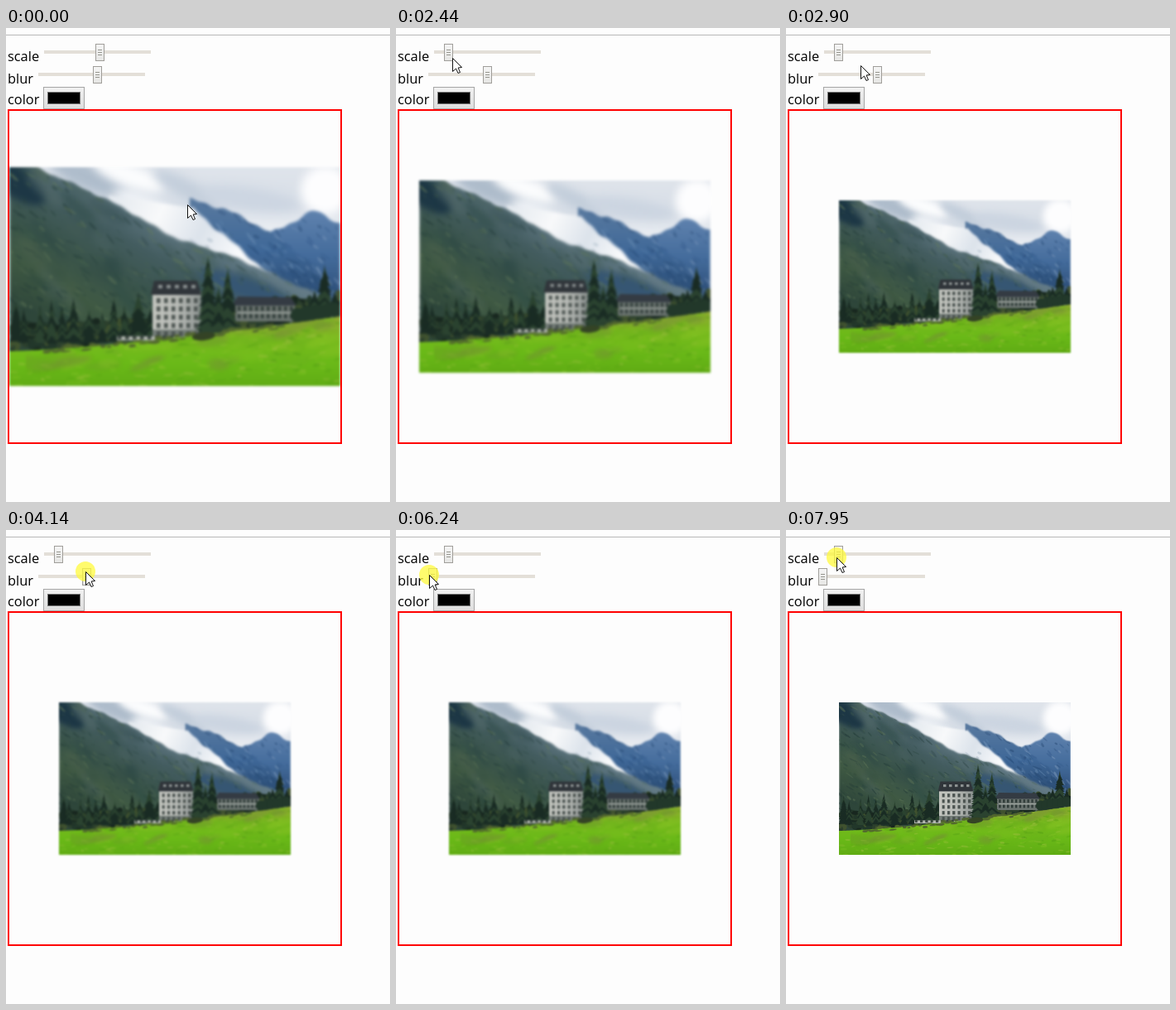
Animation, 464 px wide and 572 px high, one loop 8000 ms. Source, as an HTML page with a canvas:

```html
<!DOCTYPE html>
<html lang="en">
<head>
<meta charset="utf-8">
<title>Image filter controls</title>
<style>
html, body { margin: 0; width: 100%; height: 100%; overflow: hidden; background: #fdfdfd; }
canvas { display: block; }
</style>
</head>
<body>
<canvas id="stage" width="464" height="572"></canvas>
<script>
const LOOP = 8000, W = 400, H = 264;
const ctx = document.getElementById('stage').getContext('2d');

// Pointer moves: start, end, destination
const moves = [
  [0, 340, 135, 52], [500, 950, 109, 22], [1350, 1650, 94, 28], [1650, 2120, 61.5, 30],
  [2300, 2590, 74, 43], [2590, 3130, 102, 47], [3210, 3450, 106, 53], [4060, 4140, 96, 50],
  [4140, 4700, 56, 53], [4920, 5150, 72, 60], [5310, 5780, 59, 55], [6000, 6350, 31, 53],
  [6460, 7010, 61, 37], [7100, 7330, 61, 33]
];
const scaleDrags = [[1180, 2340]];
const blurDrags = [[3600, 4850], [5930, 6430]];
const presses = [...scaleDrags, ...blurDrags, [7950, LOOP]];

const clamp = (v, lo = 0, hi = 1) => Math.min(hi, Math.max(lo, v));
const easeOut = (t, start, length) => 1 - Math.pow(1 - clamp((t - start) / length), 2.3);

function pointerAt(t) {
  let x = 219, y = 213;
  for (const [start, end, toX, toY] of moves) {
    const p = clamp((t - start) / (end - start));
    x += (toX - x) * p;
    y += (toY - y) * p;
  }
  return [x, y];
}

// Both thumbs are only ever dragged to the left
function thumbAt(t, rest, least, grab, drags) {
  for (const [from, to] of drags)
    if (t >= from) rest = Math.min(rest, pointerAt(Math.min(t, to))[0] + grab);
  return Math.max(rest, least);
}

function shade(c, x0, y0, x1, y1, ...colors) {
  const g = c.createLinearGradient(x0, y0, x1, y1);
  colors.forEach((color, i) => g.addColorStop(i / (colors.length - 1), color));
  return g;
}

function trace(c, pts) {
  c.beginPath();
  for (let i = 0; i < pts.length; i += 2) c.lineTo(pts[i], pts[i + 1]);
  c.closePath();
}

function paintLandscape() {
  const cv = document.createElement('canvas');
  cv.width = W; cv.height = H;
  const c = cv.getContext('2d');
  let seed = 7;
  const rnd = (a = 0, b = 1) => {
    seed = (seed * 16807) % 2147483647;
    return a + (b - a) * seed / 2147483647;
  };
  const box = (color, x, y, w, h) => { c.fillStyle = color; c.fillRect(x, y, w, h); };
  const soft = (blur, draw) => { c.save(); c.filter = `blur(${blur}px)`; draw(); c.restore(); };
  const blob = (color, x, y, rx, ry, turn = 0) => {
    c.fillStyle = color;
    c.beginPath(); c.ellipse(x, y, rx, ry, turn, 0, 7); c.fill();
  };
  const below = (top, x0 = 0, x1 = W) => {
    const pts = [x1, H, x0, H];
    for (let x = x0; x <= x1; x += 2) pts.push(x, top(x));
    trace(c, pts);
  };
  const area = (color, top, x0, x1) => { below(top, x0, x1); c.fillStyle = color; c.fill(); };
  // Random streaks inside the area under a curve
  const streaks = (top, x0, colors, count, turn, size, y0, y1) => {
    c.save();
    below(top, x0); c.clip();
    for (let i = 0; i < count; i++) {
      c.globalAlpha = rnd(.15, .5);
      blob(colors[i % colors.length], rnd(x0, W), rnd(y0, y1),
        rnd(2, 8) * size, rnd(.6, 2) * size, turn + rnd(-.3, .3));
    }
    c.restore();
  };
  const fir = (x, top, bottom, w) => {
    for (let y = top; y < bottom; y += 4) {
      const r = 1 + w * Math.pow((y - top) / (bottom - top), .7);
      c.fillStyle = rnd() < .6 ? '#1a2c24' : '#2b4330';
      trace(c, [x, y - 4, x + r * rnd(.7, 1.1), y + 6, x - r * rnd(.7, 1.1), y + 6]);
      c.fill();
    }
  };
  const windows = (color, x0, x1, y0, y1, dx, dy) => {
    for (let y = y0; y < y1; y += dy)
      for (let x = x0; x < x1; x += dx) box(color, x, y, dx * .5, dy * .6);
  };

  const jag = x => Math.sin(x * .31) + 1.6 * Math.sin(x * .13 + 1);
  const ridge = x => .45 * (x - 32) + 9 * Math.exp(-(((x - 200) / 50) ** 2)) + jag(x) * .6;
  const peak = x => 40 + .2 * (x - 222) + .0024 * (x - 222) ** 2 + jag(x);
  const farPeak = x => 51 + .55 * Math.hypot(x - 369, 4) + jag(x);
  const glacier = x => x < 222 ? 34 + .15 * (x - 120) : 50 + .85 * (x - 222) + jag(x);
  const meadow = x => 222 - 42 * Math.pow(x / W, 1.4);

  box(shade(c, 0, 0, 0, 90, '#dfe4eb', '#d7dee7', '#f3f5f8'), 0, 0, W, H);
  soft(6, () => {
    blob('#aebccb', 95, 12, 50, 15, .4);
    blob('#fbfcfd', 145, 10, 45, 13, .35);
    blob('#c3cedb', 215, 27, 45, 11, .5);
    blob('#ccd5e1', 290, 38, 60, 13, .15);
    blob('#fdfdfe', 382, 28, 30, 30);
    blob('#f0f3f7', 160, 42, 38, 9, .35);
  });

  soft(1, () => {
    area(shade(c, 0, 52, 0, 165, '#5f82ae', '#436b9b', '#2b4a72'), farPeak, 316);
    area(shade(c, 0, 40, 0, 160, '#58799f', '#3f6898', '#294a70'), peak, 218);
  });
  streaks(farPeak, 316, ['#24466f', '#86a0bf', '#365b8c'], 90, .8, 1, 52, 165);
  streaks(peak, 218, ['#24466f', '#6d90b6', '#2b517f'], 200, .65, 1.2, 42, 165);
  soft(1.5, () => {
    area(shade(c, 130, 40, 325, 135, '#e6ebf0', '#f8f9fa', '#dce3eb', '#fafbfc', '#eef1f4'), glacier, 120, 326);
  });
  streaks(x => Math.max(glacier(x), ridge(x) - 14), 140, ['#a8b6c3', '#8197a8'], 40, .5, 1.2, 60, 125);

  soft(1.5, () => {
    area(shade(c, 140, 35, 50, 190, '#647b87', '#435c5f', '#3a544b', '#3f5943', '#2e463a'), ridge);
  });
  soft(4, () => {
    blob('#1d3745', 8, 18, 42, 18, .6);
    streaks(ridge, 0, ['#24403f', '#546a50', '#2c4a44', '#566d6d'], 70, .65, 5, 0, 180);
    blob('#365673', 290, 148, 65, 13, .35);
  });
  streaks(ridge, 0, ['#1f3735', '#647b5a', '#29443d', '#46614c'], 480, .65, 1.1, 0, 190);

  // Tree line
  for (let i = 0; i < 420; i++) {
    const x = rnd(0, W), edge = meadow(x);
    blob(['#18271f', '#22372a', '#2c402d', '#40522f'][i % 4],
      x, edge - 27 * rnd() ** 1.3 - 3, rnd(3, 8), rnd(3, 7));
  }
  for (let x = 8; x < 175; x += rnd(9, 20)) fir(x, rnd(160, 178), 208, rnd(6, 12));
  fir(156, 154, 208, 17);

  // Buildings
  box(shade(c, 172, 0, 232, 0, '#c3c5bf', '#b9bcb7', '#8f9593'), 173, 150, 59, 46);
  box('#747d78', 173, 196, 56, 10);
  c.fillStyle = '#30353a';
  trace(c, [171, 154, 175, 137, 227, 137, 232, 154]);
  c.fill();
  windows('#4b5350', 178, 230, 158, 200, 9, 10);
  windows('#8c9292', 180, 224, 142, 146, 10, 7);
  box('#b3b7b1', 130, 204, 70, 5);
  windows('#38443e', 131, 198, 203, 208, 9, 8);

  box('#6c7571', 273, 164, 72, 22);
  c.fillStyle = '#343b43';
  trace(c, [269, 167, 276, 156, 340, 157, 347, 167]);
  c.fill();
  windows('#303c39', 276, 342, 168, 184, 7, 9);
  box('#a4aba6', 276, 175, 65, 1.5);
  for (const [x, top, w] of [[240, 110, 16], [264, 125, 13], [253, 146, 10], [381, 121, 14], [369, 150, 11], [393, 151, 10]])
    fir(x, top, meadow(x) - 7, w);
  for (let x = 348; x < W; x += 9) blob('#22382a', x, meadow(x) - 9, 8, 9);

  // Meadow
  area(shade(c, 0, 181, 0, H, '#8eaa30', '#78bb1e', '#6ab918', '#60ac14'), meadow);
  soft(2, () => streaks(meadow, 20, ['#77893a', '#8bc427', '#6aae1d'], 70, -.12, 4, 190, 240));
  streaks(meadow, 0, ['#a0bf42', '#529d13', '#83c325'], 260, -.05, 1, 182, H);
  for (let x = 45; x < 330; x += rnd(3, 9)) blob('#52662f', x, meadow(x) + rnd(-3, 4), rnd(3, 7), rnd(1, 2.5), -.1);
  blob('#344325', 235, 204, 14, 5, -.1);
  return cv;
}
const landscape = paintLandscape();

function slider(x, y, thumb) {
  ctx.fillStyle = '#e3dfd8';
  ctx.fillRect(x, y, 129, 4);
  const left = Math.round(thumb - 5.5), top = y - 8;
  ctx.fillStyle = shade(ctx, 0, top, 0, top + 21, '#f5f5f5', '#e6e6e4');
  ctx.fillRect(left, top, 11, 21);
  ctx.strokeStyle = '#a09e9a';
  ctx.lineWidth = 1;
  ctx.strokeRect(left + .5, top + .5, 10, 20);
  ctx.fillStyle = '#96968f';
  for (let i = 0; i < 3; i++) ctx.fillRect(left + 3, top + 7 + i * 3, 5, 1);
}

function controls(t) {
  ctx.fillStyle = '#b8b8b8';
  ctx.fillRect(0, 8, 464, 1);
  ctx.fillStyle = '#000';
  ctx.font = '16.4px "Open Sans", "Noto Sans", sans-serif';
  ctx.fillText('scale', 2, 40);
  ctx.fillText('blur', 2, 67);
  ctx.fillText('color', 2, 92);
  slider(46, 27, thumbAt(t, 113.5, 51.5, 0, scaleDrags));
  slider(39, 54, thumbAt(t, 110.5, 44.5, 1.5, blurDrags));
  ctx.fillStyle = shade(ctx, 0, 71, 0, 98, '#f2f2f2', '#dedede');
  ctx.fillRect(45, 71, 50, 27);
  ctx.strokeStyle = '#a5a5a5';
  ctx.strokeRect(45.5, 71.5, 49, 26);
  ctx.fillStyle = '#000';
  ctx.fillRect(50, 77, 40, 15);
  ctx.strokeStyle = '#777';
  ctx.strokeRect(50.5, 77.5, 39, 14);
}

function picture(t) {
  const scale = 1 - .3 * easeOut(t, 2340, 500);
  const blur = 1.8 * scale * (1 - easeOut(t, 6430, 450));
  ctx.save();
  ctx.beginPath();
  ctx.rect(4, 100, 400, 400);
  ctx.clip();
  ctx.filter = blur > .02 ? `blur(${blur}px)` : 'none';
  ctx.drawImage(landscape, 204 - W / 2 * scale, 300 - H / 2 * scale, W * scale, H * scale);
  ctx.restore();
  ctx.strokeStyle = '#f00';
  ctx.lineWidth = 2;
  ctx.strokeRect(3, 99, 402, 402);
}

function cursor(t) {
  const [x, y] = pointerAt(t).map(Math.round);
  if (presses.some(([from, to]) => t >= from && t < to)) {
    ctx.fillStyle = 'rgba(255, 250, 60, .75)';
    ctx.beginPath();
    ctx.arc(x, y, 12, 0, 7);
    ctx.fill();
  }
  ctx.save();
  ctx.translate(x + .5, y + .5);
  trace(ctx, [0, 0, 0, 16, 4, 12.5, 6.5, 18, 9, 17, 6.6, 11.5, 11, 11]);
  ctx.fillStyle = '#fff';
  ctx.fill();
  ctx.strokeStyle = '#111';
  ctx.lineWidth = 1;
  ctx.stroke();
  ctx.restore();
}

function frame() {
  const t = performance.now() % LOOP;
  ctx.fillStyle = '#fdfdfd';
  ctx.fillRect(0, 0, 464, 572);
  controls(t);
  picture(t);
  cursor(t);
  requestAnimationFrame(frame);
}
frame();
</script>
</body>
</html>
```
